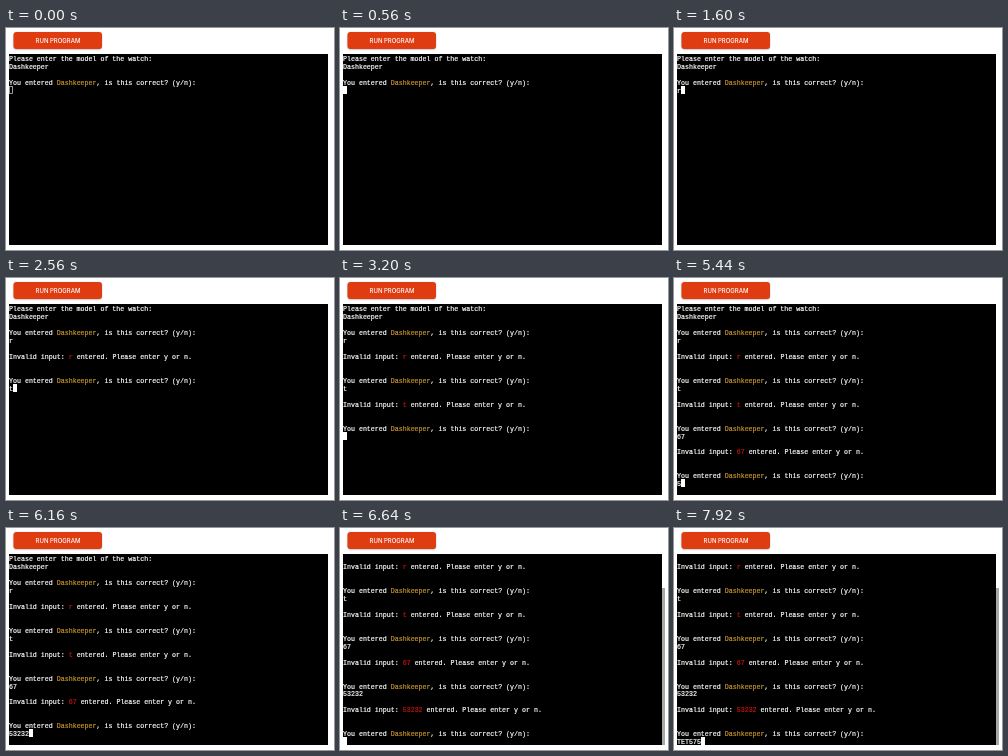
Recreate the animation shown at these times as an HTML page with a canvas. Size 328 by 222 pixels, loop 8 s.

```html
<!DOCTYPE html>
<html lang="en">
<head>
<meta charset="utf-8">
<title>Terminal</title>
<style>
html, body { margin: 0; width: 100%; height: 100%; overflow: hidden; background: #fff; }
canvas { display: block; width: 328px; height: 222px; }
</style>
</head>
<body>
<canvas id="stage"></canvas>
<script>
const W = 328, H = 222, LOOP = 8000;
const LEFT = 3, TOP = 26, CELL = 3.98, ROW = 7.97, ROWS = 24;
const HEIGHT = 191;
const WHITE = '#fff', AMBER = '#c4932c', RED = '#c0140e';
const FOCUS_AT = 320;
const MODEL = 'Dashkeeper';

// Each answer: typed text, time of each key, time of Enter
const answers = [
  { text: 'r', keys: [1520], enter: 2000 },
  { text: 't', keys: [2480], enter: 3040 },
  { text: '67', keys: [4240, 4400], enter: 4720 },
  { text: '53232', keys: [5440, 5760, 5920, 6000, 6160], enter: 6640 },
  { text: 'TET575', keys: [7360, 7520, 7600, 7680, 7760, 7920], enter: Infinity }
];

const canvas = document.getElementById('stage');
const ctx = canvas.getContext('2d');
const dpr = window.devicePixelRatio || 1;
canvas.width = W * dpr;
canvas.height = H * dpr;
ctx.scale(dpr, dpr);

const plain = text => [[text, WHITE]];
const question = () => [
  ['You entered ', WHITE], [MODEL, AMBER], [', is this correct? (y/n):', WHITE]
];
const rejection = text => [
  ['Invalid input: ', WHITE], [text, RED], [' entered. Please enter y or n.', WHITE]
];
const rowTop = row => Math.round(TOP + row * ROW);

function linesAt(t) {
  const lines = [plain('Please enter the model of the watch:'), plain(MODEL), []];
  for (const { text, keys, enter } of answers) {
    const typed = text.slice(0, keys.filter(k => k <= t).length);
    lines.push(question(), plain(typed));
    if (t < enter) return { lines, column: typed.length };
    lines.push([], rejection(text), [], []);
  }
}

function rect(x, y, w, h, color) {
  ctx.fillStyle = color;
  ctx.fillRect(x, y, w, h);
}

function drawButton() {
  ctx.save();
  ctx.shadowColor = 'rgba(0, 0, 0, 0.35)';
  ctx.shadowBlur = 1.5 * dpr;
  ctx.shadowOffsetY = 0.5 * dpr;
  ctx.fillStyle = '#df3c12';
  ctx.beginPath();
  ctx.roundRect(7.5, 4, 88.5, 17, 3);
  ctx.fill();
  ctx.restore();
  ctx.fillStyle = '#fff';
  ctx.font = '500 6px Inter, sans-serif';
  ctx.textAlign = 'center';
  ctx.fillText('RUN PROGRAM', 52, 15);
  ctx.textAlign = 'left';
}

function drawLine(parts, row) {
  const baseline = rowTop(row) + 6.6;
  let col = 0;
  for (const [text, color] of parts) {
    const x = LEFT + col * CELL;
    ctx.fillStyle = ctx.strokeStyle = color;
    ctx.fillText(text, x, baseline);
    ctx.strokeText(text, x, baseline);
    col += text.length;
  }
}

function drawCursor(column, row, focused) {
  const x = Math.round(LEFT + column * CELL), y = rowTop(row);
  if (focused) {
    rect(x, y, 4, 8, '#fff');
  } else {
    ctx.strokeStyle = '#ddd';
    ctx.lineWidth = 0.7;
    ctx.strokeRect(x + 0.5, y + 0.5, 3, 7);
  }
}

function drawTerminal(t) {
  rect(LEFT, TOP, 319, HEIGHT, '#000');
  const { lines, column } = linesAt(t);
  const scroll = Math.max(0, lines.length - ROWS);
  ctx.font = `${CELL / 0.6}px "Liberation Mono", "Courier New", monospace`;
  ctx.lineWidth = 0.2;
  lines.slice(scroll).forEach(drawLine);
  drawCursor(column, lines.length - 1 - scroll, t >= FOCUS_AT);
  if (scroll) {
    const thumb = Math.floor(HEIGHT * ROWS / lines.length) - 1;
    rect(322, TOP + HEIGHT - thumb, 3, thumb, '#a8a8a8');
  }
}

function draw(now) {
  rect(0, 0, W, H, '#fff');
  drawButton();
  drawTerminal(now % LOOP);
}

const start = performance.now();
function tick() {
  draw(performance.now() - start);
  requestAnimationFrame(tick);
}
tick();
</script>
</body>
</html>
```
